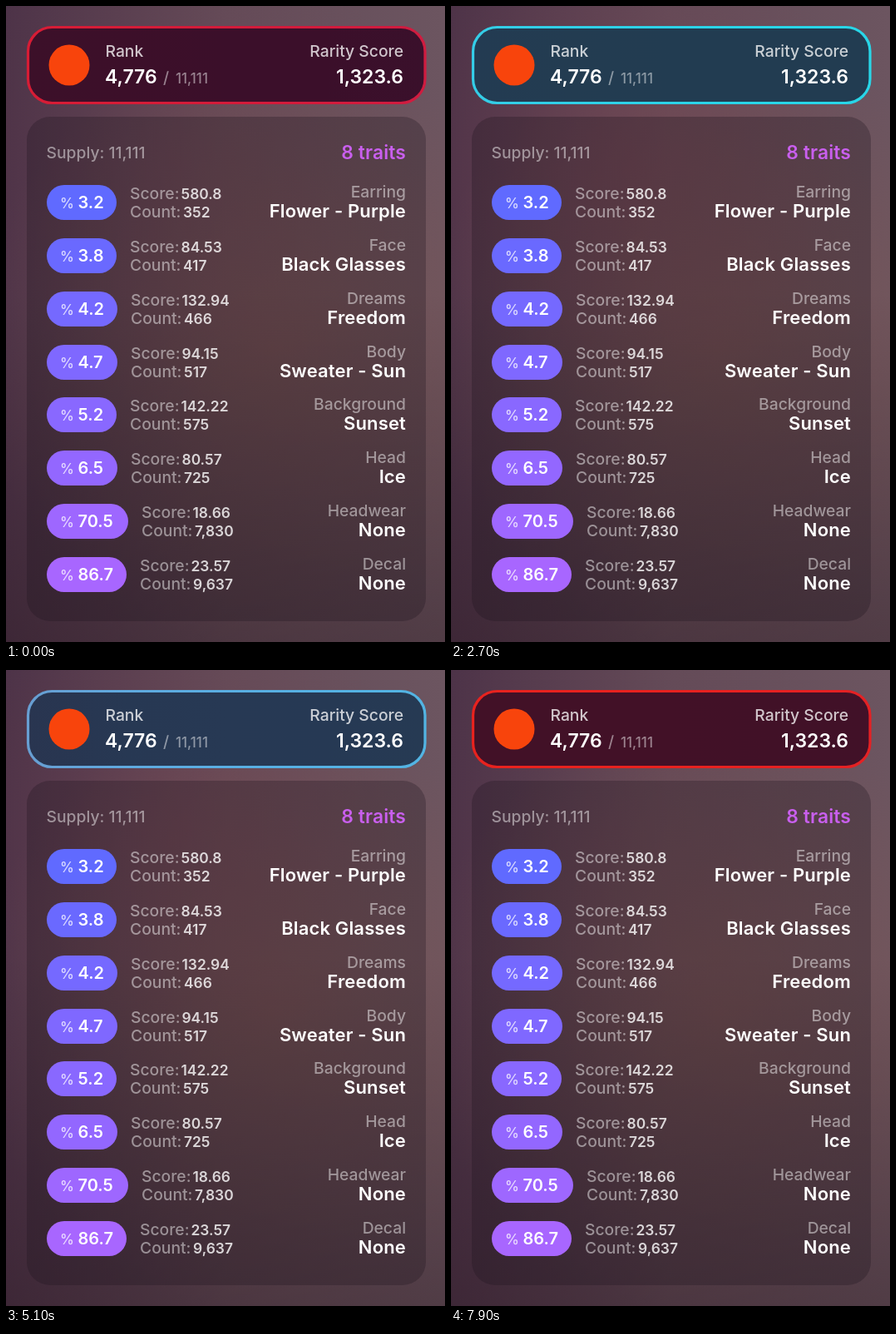
An HTML page that plays this animation: 528x764 px, repeating every 8 s.

```html
<!DOCTYPE html>
<html lang="en">
<head>
<meta charset="utf-8">
<title>Rarity card</title>
<style>
  html, body { margin: 0; width: 100%; height: 100%; overflow: hidden; background: #4b3546; }
  svg { display: block; width: 528px; height: 764px; }
  text { font: 500 19.3px Quicksand, Inter, sans-serif; fill: #fff; }
  .dim { fill-opacity: .48; }
  .soft { fill-opacity: .76; }
  .big { font-size: 23px; font-weight: 600; }
  .name { font-size: 22px; font-weight: 600; letter-spacing: .15px; }
  .traits { font-size: 22.8px; fill: #c95fee; }
  .num { font-size: 17.4px; font-weight: 600; fill-opacity: .8; }
  .pct { font-size: 20px; font-weight: 600; }
  .sign { font-size: 17px; fill-opacity: .75; }
  .small { font-size: 17px; }
  .end { text-anchor: end; }
</style>
</head>
<body>
<svg id="stage" viewBox="0 0 528 764">
  <defs>
    <linearGradient id="base">
      <stop stop-color="#4d3348"/><stop offset=".5" stop-color="#634b58"/><stop offset="1" stop-color="#6c5560"/>
    </linearGradient>
    <linearGradient id="shade" x2="0" y2="1">
      <stop offset=".45" stop-color="#24141a" stop-opacity="0"/><stop offset="1" stop-color="#24141a" stop-opacity=".38"/>
    </linearGradient>
    <radialGradient id="warm" gradientUnits="userSpaceOnUse" cx="320" cy="410" r="360">
      <stop stop-color="#805650" stop-opacity=".6"/><stop offset="1" stop-color="#805650" stop-opacity="0"/>
    </radialGradient>
    <radialGradient id="glow" gradientUnits="userSpaceOnUse" cx="210" cy="190" r="290">
      <stop stop-color="#7c4250" stop-opacity=".45"/><stop offset="1" stop-color="#7c4250" stop-opacity="0"/>
    </radialGradient>
    <linearGradient id="edge"/>
    <linearGradient id="fill"/>
  </defs>
  <rect width="528" height="764" fill="url(#base)"/>
  <rect width="528" height="764" fill="url(#warm)"/>
  <rect id="tint" width="528" height="764" fill="url(#glow)"/>
  <rect width="528" height="764" fill="url(#shade)"/>

  <rect x="26.5" y="25.5" width="477.5" height="91" rx="29" fill="url(#fill)" stroke="url(#edge)" stroke-width="3.2"/>
  <circle cx="76" cy="71" r="24.5" fill="#f8440c"/>
  <text x="119.5" y="61" class="soft">Rank</text>
  <text x="119" y="92.5" class="big">4,776</text>
  <text x="189" y="92.5" class="dim">/</text>
  <text x="204" y="92.5" class="dim small">11,111</text>
  <text x="478" y="61" class="soft end">Rarity Score</text>
  <text x="478" y="92.5" class="big end">1,323.6</text>

  <rect x="25" y="133" width="480" height="606" rx="28" fill="#1c121e" fill-opacity=".29"/>
  <text x="48.5" y="183" class="dim">Supply: 11,111</text>
  <text x="481" y="184" class="name traits end">8 traits</text>
  <g id="rows"></g>
</svg>
<script>
const $ = id => document.getElementById(id);

// percent, pill width, score, count, trait, value
const traits = [
  ['3.2', 84, '580.8', '352', 'Earring', 'Flower - Purple'],
  ['3.8', 84, '84.53', '417', 'Face', 'Black Glasses'],
  ['4.2', 85, '132.94', '466', 'Dreams', 'Freedom'],
  ['4.7', 85, '94.15', '517', 'Body', 'Sweater - Sun'],
  ['5.2', 84, '142.22', '575', 'Background', 'Sunset'],
  ['6.5', 85, '80.57', '725', 'Head', 'Ice'],
  ['70.5', 98, '18.66', '7,830', 'Headwear', 'None'],
  ['86.7', 96, '23.57', '9,637', 'Decal', 'None']
];
const label = (x, y, cls, str) => `<text x="${x}" y="${y}" class="${cls}">${str}</text>`;
const mix = (a, b, k) => a.map((v, i) => Math.round(v + (b[i] - v) * k));
const rgb = c => `rgb(${c})`;

$('rows').innerHTML = traits.map(([pct, w, score, count, trait, value], i) => {
  const x = 65 + w, pill = rgb(mix([96, 106, 255], [168, 102, 255], i / 7));
  return `<g transform="translate(0 ${Math.round(215 + i * 63.86)})">
    <rect x="49" width="${w}" height="42" rx="21" fill="${pill}"/>` +
    label(65, 28, 'sign', '%') + label(86.5, 28, 'pct', pct) +
    label(x, 17, 'dim', 'Score:') + label(x + 61.5, 17, 'num', score) +
    label(x, 39, 'dim', 'Count:') + label(x + 64, 39, 'num', count) +
    label(481, 15, 'dim end', trait) + label(481, 38.5, 'name end', value) + '</g>';
}).join('');

// red, crimson, blue, cyan
const edge = [[232, 34, 30], [208, 26, 62], [92, 172, 226], [40, 214, 232]];
const fill = [[66, 17, 39], [58, 15, 42], [39, 57, 84], [34, 60, 81]];

function sample(colors, u) {
  const p = Math.min(Math.max(u, 0), 1) * 3, i = Math.min(Math.floor(p), 2);
  return rgb(mix(colors[i], colors[i + 1], p - i));
}

const offsets = [0, .25, .5, .75, 1];
for (const id of ['edge', 'fill']) {
  $(id).innerHTML = offsets.map(o => `<stop offset="${o}"/>`).join('');
}

function draw(now) {
  const t = now % 8000;
  const u = .5 + .5 * Math.cos((t - 3200) / 5000 * Math.PI);
  for (const [id, colors] of [['edge', edge], ['fill', fill]]) {
    [...$(id).children].forEach((stop, i) =>
      stop.setAttribute('stop-color', sample(colors, u + (offsets[i] - .5) * .1)));
  }
  $('tint').setAttribute('opacity', .25 + .65 * u);
  requestAnimationFrame(draw);
}
draw(performance.now());
</script>
</body>
</html>
```
